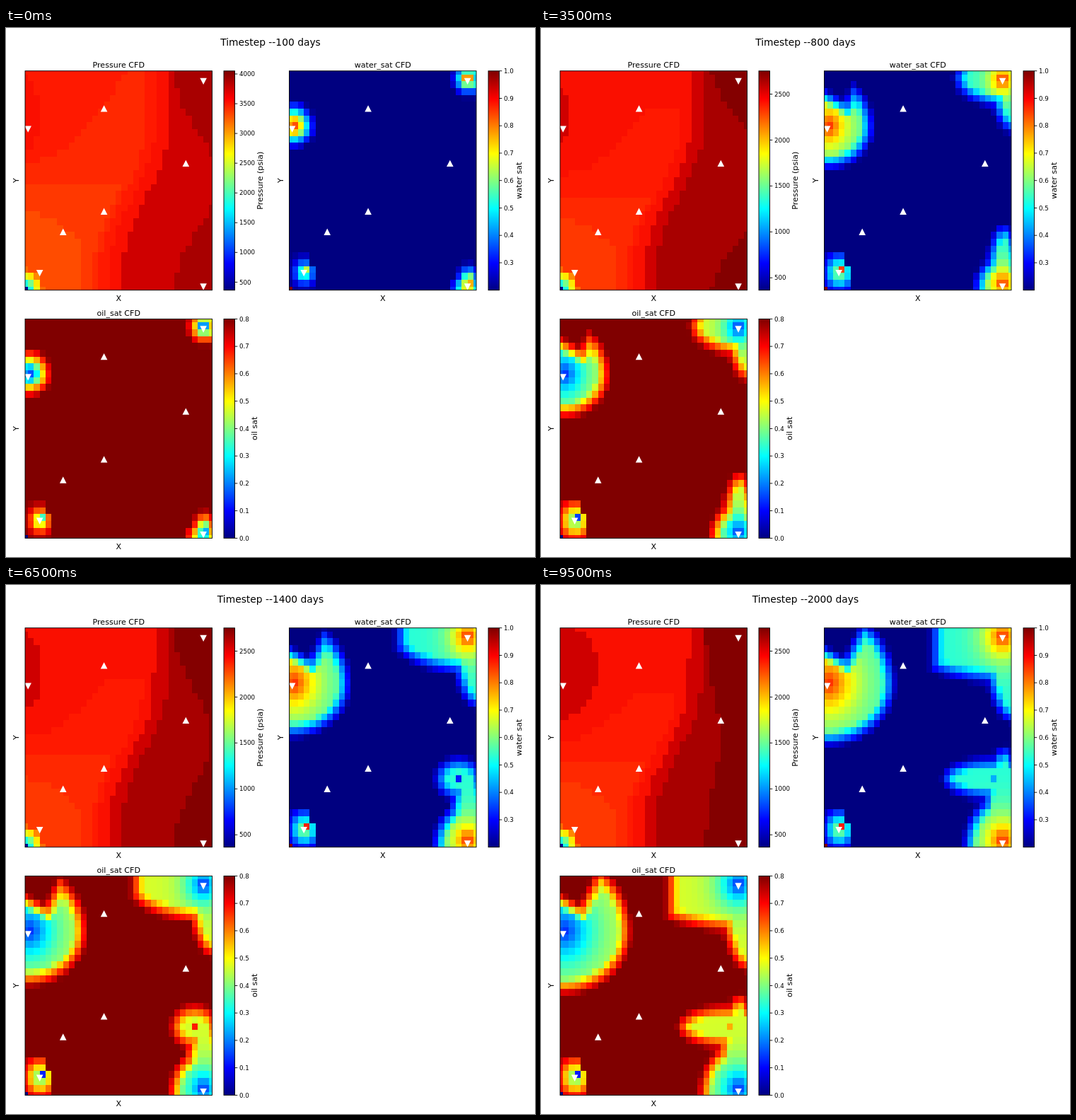
Recreate the animation shown at these times as an HTML page with a canvas. Size 748 by 748 pixels, loop 10 s.

```html
<!DOCTYPE html>
<html>
<head>
<meta charset="utf-8">
<style>
html, body { margin: 0; width: 100%; height: 100%; overflow: hidden; background: #fff; }
canvas { display: block; width: 748px; height: 748px; }
</style>
</head>
<body>
<canvas id="stage" width="748" height="748"></canvas>
<script>
const ctx = document.getElementById('stage').getContext('2d');
const N = 32, W = 264.5, H = 310, DX = W / N, DY = H / N;
const UP = [[13.5, 5.5], [27.5, 13.5], [13.5, 20.5], [6.5, 23.5]];
const DOWN = [[30.5, 1.5], [.5, 8.5], [2.5, 29.5], [30.5, 31.5]];
const REDS = ['#840000', '#a80000', '#cf0000', '#fa0f00', '#ff1900', '#ff2800', '#ff3800', '#ff4c00'];

const clamp = v => Math.max(0, Math.min(1, v));

function jet(v) {
  const part = c => Math.round(255 * clamp(1.5 - Math.abs(4 * clamp(v) - c)));
  return `rgb(${part(3)},${part(2)},${part(1)})`;
}

// Approximate distance inside an ellipse edge, negative outside
function oval(x, y, a, b) {
  const rho = Math.hypot(x / a, y / b);
  return (1 - rho) * rho / (Math.hypot(x / a / a, y / b / b) || 1e-9);
}

// Water saturation scaled to 0..1; k counts steps of 100 days
function waterField(k) {
  const q = Math.sqrt(k + 1), grow = Math.min(1, k / 3);
  const hot = .88 - .23 * Math.exp(-k / 3.5);

  // Each front returns its depth at a cell
  const left = (i, j) => {
    const r = 1.5 + 2.2 * q, dy = j - 8.2;
    const barrier = Math.max(j - 2.9 - .5 * i, .88 * (i - 4.2 - .55 * (3.5 - j)));
    return Math.min(oval(i - .5, dy, r, r / (dy > 0 ? 1.3 : 1.05)), barrier);
  };
  const top = (i, j) => Math.min(i - 18.4, Math.max(
    oval(i - 30.5, j - 1, 2.5 + .8 * k, 2.5 + .23 * k),
    oval(i - 32, j - 1, 2.8 + .1 * k, 2.9 * q - .4)));
  const bottom = (i, j) => Math.max(
    oval(i - 30.5, j - 32, 1.8 + 1.05 * q, .8 + 1.5 * q),
    oval(i - 30.7, j - 31.3, 1.6 + .5 * q, 3.1 * q - .1),
    k > 8 ? oval(i - 29, j - 22, .78 * (k - 8), 3) : -9);
  const plumes = [[left, .7, 8, .8 + .95 * q], [top, 30.5, 1.2, .8 + .5 * q], [bottom, 30.5, 31, .8 + .5 * q]];

  return (i, j) => {
    if (i === 0 && j === N) return 1;
    let w = .2;
    for (const [front, cx, cy, reach] of plumes) {
      const heat = Math.exp(-((Math.hypot(i - cx, j - cy) / reach) ** 1.3));
      const fill = clamp((front(i, j) + .6) / 2.6);
      w = Math.max(w, .2 + fill * (.33 + .34 * heat));
    }
    // Sealed pocket around the lower left well
    if (j > 26 && (i < 4 || i === 4 && j > 28)) {
      const d2 = (i - 2.6) ** 2 + (j - 29.4) ** 2;
      w = i === 3 && j === 29 ? hot : .2 + (.36 + .04 * grow) * Math.exp(-d2 / (3 + 3 * grow));
    }
    return (w - .2) / .8;
  };
}

// Nested pressure bands; the first step sits one shade higher
function pressureField(k) {
  const u = (k ? k - 1 : -11) / 18, spread = k ? u : .6, shade = k ? 0 : 1;
  const hump = 2.6 + 22 * (1 - spread) ** 1.5;
  return (i, j) => {
    const low = .02 + .38 * Math.hypot(i, N - j) ** .62;
    if (low < .78) return jet(low);

    const s = clamp((j - 9) / 19);
    const d = i - 22.2 + 7.6 * s * s * (3 - 2 * s) + .5 * clamp(u) * Math.sin(Math.PI * j / N);
    const darkEdge = 25.7 - spread + hump * Math.exp(-(((j - 16) / 9) ** 2));
    const ridge = Math.max(3 + 6.5 * u, 14.5 + 2 * u - .045 * i * i);
    let band = 3;
    if (i > darkEdge) band = 0;
    else if (d > 2.2) band = 1;
    else if (d > 0 || oval(i + .5, j - 6.3, 2 + 5 * spread ** 3, 3 + 4 * spread) > 0) band = 2;
    else if (d < -4.9 && j > 21.3 + u + .05 * i * i) band = 6;
    else if (d < -2.8 && j > 17.5 + 2 * u) band = 5;
    else if (d < -1.8 && j > ridge) band = 4;
    return REDS[band + shade];
  };
}

function text(s, x, y, size, align = 'center', turn = 0) {
  ctx.save();
  ctx.translate(x, y);
  ctx.rotate(turn);
  ctx.font = `${size}px "DejaVu Sans", sans-serif`;
  ctx.textAlign = align;
  ctx.fillStyle = '#000';
  ctx.fillText(s, 0, size * .365);
  ctx.restore();
}

function frame(x, y, w, h) {
  ctx.strokeStyle = '#000';
  ctx.lineWidth = .9;
  ctx.strokeRect(x, y, w, h);
}

function wells(x, y, list, dir) {
  ctx.fillStyle = '#fff';
  for (const [i, j] of list) {
    const cx = x + i * DX, cy = y + j * DY;
    ctx.beginPath();
    ctx.moveTo(cx, cy - 4.8 * dir);
    ctx.lineTo(cx - 4.8, cy + 4.6 * dir);
    ctx.lineTo(cx + 4.8, cy + 4.6 * dir);
    ctx.fill();
  }
}

function panel(x, y, title, color) {
  ctx.save();
  ctx.beginPath();
  ctx.rect(x, y, W, H);
  ctx.clip();
  for (let j = 0; j <= N; j++) {
    for (let i = 0; i <= N; i++) {
      const x0 = Math.round(x + (i - .5) * DX), y0 = Math.round(y + (j - .5) * DY);
      ctx.fillStyle = color(i, j);
      ctx.fillRect(x0, y0, Math.round(x + (i + .5) * DX) - x0, Math.round(y + (j + .5) * DY) - y0);
    }
  }
  ctx.restore();
  wells(x, y, UP, 1);
  wells(x, y, DOWN, -1);
  frame(x, y, W, H);
  text(title, x + W / 2, y - 8.7, 11.07);
  text('X', x + W / 2, y + H + 11.5, 11.07);
  text('Y', x - 13, y + H / 2, 11.07, 'center', -Math.PI / 2);
}

function colorbar(x, y, label, labelX, lo, hi, first, last, step, digits) {
  for (let n = 0; n < H; n++) {
    ctx.fillStyle = jet(1 - n / H);
    ctx.fillRect(x, Math.round(y) + n, 15.5, 1);
  }
  frame(x, y, 15.5, H);
  for (let v = first; v < last + step / 2; v += step) {
    const ty = y + H * (hi - v) / (hi - lo);
    ctx.fillStyle = '#000';
    ctx.fillRect(x + 15.5, ty - .45, 3.8, .9);
    text(v.toFixed(digits), x + 22, ty, 8.65, 'left');
  }
  text(label, labelX, y + H / 2, 11.07, 'center', -Math.PI / 2);
}

function draw(k) {
  ctx.fillStyle = '#fff';
  ctx.fillRect(0, 0, 748, 748);
  text(`Timestep --${(k + 1) * 100} days`, 374, 20, 13.83);
  const water = waterField(k);
  panel(27, 60.7, 'Pressure CFD', pressureField(k));
  panel(400.5, 60.7, 'water_sat CFD', (i, j) => jet(water(i, j)));
  panel(27, 411.4, 'oil_sat CFD', (i, j) => jet(1 - water(i, j)));
  colorbar(308, 60.7, 'Pressure (psia)', 359, 365, k ? 2752 : 4051, 500, k ? 2500 : 4000, 500, 0);
  colorbar(682, 60.7, 'water sat', 725, .2, 1, .3, 1, .1, 1);
  colorbar(308, 411.4, 'oil sat', 351, 0, .8, 0, .8, .1, 1);
}

let shown = -1;
function tick() {
  const k = Math.floor(performance.now() % 10000 / 500);
  if (k !== shown) draw(shown = k);
  requestAnimationFrame(tick);
}
tick();
</script>
</body>
</html>
```
